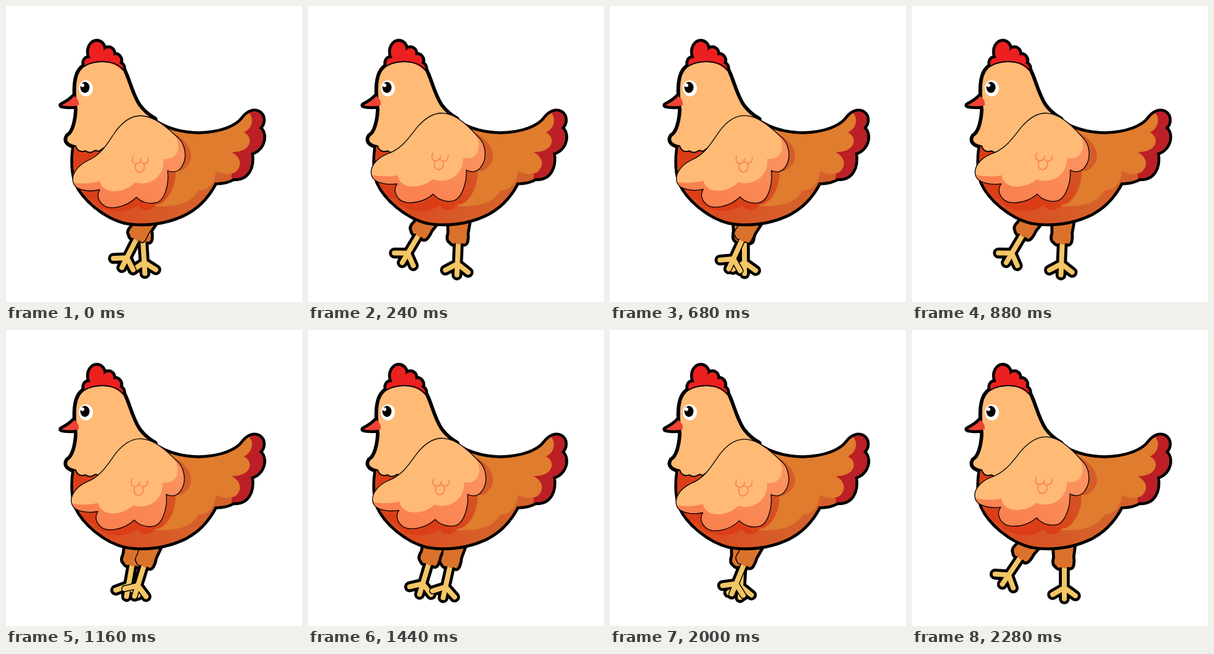
An HTML page for the animation above (2.36 s loop, 480 by 480 pixels).

```html
<!DOCTYPE html>
<html>
<head>
<meta charset="utf-8">
<style>
html, body { margin: 0; width: 100%; height: 100%; overflow: hidden; background: #fff; }
svg { display: block; width: 100%; height: 100%; }
</style>
</head>
<body>
<svg viewBox="0 0 480 480" fill="none" stroke-linejoin="round" stroke-linecap="round">
  <defs>
    <linearGradient id="belly" gradientUnits="userSpaceOnUse" x1="150" y1="0" x2="290" y2="0">
      <stop offset="0" stop-color="#dc4a20"/>
      <stop offset="1" stop-color="#d6602a"/>
    </linearGradient>
    <linearGradient id="shade" gradientUnits="userSpaceOnUse" x1="180" y1="320" x2="290" y2="260">
      <stop offset=".3" stop-color="#db3e17"/>
      <stop offset="1" stop-color="#d35c28"/>
    </linearGradient>
    <linearGradient id="coral" gradientUnits="userSpaceOnUse" x1="190" y1="320" x2="250" y2="220">
      <stop offset="0" stop-color="#fa8150"/>
      <stop offset="1" stop-color="#fb9260"/>
    </linearGradient>
    <path id="body" d="M200 150C225 180 255 207 312 208C350 207 375 196 385 182C393 172 402 169 410 173C419 179 418 191 410 198C423 206 418 233 397 238C401 262 391 281 369 279C361 284 351 286 339 286C327 309 310 328 285 339C258 351 225 356 193 350C160 342 126 313 114 286C108 268 108 248 111 228Z"/>
    <path id="head" d="M128 97C145 87 178 87 190 103C198 117 203 143 215 161C223 172 232 179 241 184L180 215L150 236Q146 233 143 235Q136 240 129 235Q117 239 113 227C101 225 95 219 100 211C109 206 114 188 115 168C113 152 111 135 114 120C116 108 121 101 128 97Z"/>
    <path id="comb" d="M128 97C125 89 130 83 137 85C130 68 140 57 148 58C156 59 160 67 158 73C165 64 176 70 174 80C182 77 188 86 184 93C190 95 191 101 189 105C175 88 145 86 128 97Z"/>
    <path id="beak" d="M90 161Q104 154 111 146Q119 152 118 161Q104 164 90 161Z"/>
    <path id="feather" d="M178 203C190 187 204 178 218 178C240 178 260 196 275 210C292 222 294 246 286 259C281 269 271 271 262 267C265 287 258 316 243 319C230 322 218 317 211.5 310C195 327 168 331 158 323C149 316 147 306 152 298C135 302 115 299 110 289C104 276 114 260 132 251C156 241 166 220 178 203Z"/>
    <clipPath id="inBody"><use href="#body"/></clipPath>
    <clipPath id="inWing"><use href="#feather"/></clipPath>
  </defs>

  <g id="legs"></g>

  <g stroke="#000" stroke-width="9.6" fill="#000">
    <use href="#body"/><use href="#head"/><use href="#comb"/><use href="#beak"/>
  </g>

  <use href="#body" fill="url(#belly)"/>
  <g clip-path="url(#inBody)">
    <path fill="#bc1f25" d="M388 160H425V288H366V230Z"/>
    <path fill="#df7c2e" d="M200 150L390 170C402 176 403 197 386 205C402 213 399 237 366 237C384 247 382 262 371 270C358 275 346 271 340 267C340 287 327 300 312 299C300 322 270 327 235 324L200 260Z"/>
    <path fill="url(#shade)" d="M240 195C300 208 309 245 293 260C288 266 282 269 275 267C277 295 258 324 243 322C236 334 219 334 214 323C195 338 155 336 142 314C126 309 116 299 108 286V225H160Z"/>
  </g>

  <use href="#head" fill="#ffba76" stroke="#000" stroke-width="2"/>
  <use href="#comb" fill="#ed2020"/>
  <path d="M128 97C145 87 178 87 190 104" stroke="#000" stroke-width="1.6"/>
  <ellipse cx="129.5" cy="133.5" rx="11.5" ry="13" fill="#fff"/>
  <ellipse cx="128" cy="132" rx="7.5" ry="9" fill="#000"/>
  <circle cx="124" cy="128.5" r="3" fill="#fff"/>
  <use href="#beak" fill="#ef4334"/>

  <g id="wing">
    <use href="#feather" fill="url(#coral)"/>
    <path clip-path="url(#inWing)" fill="#ffba76" d="M100 284C116 290 138 288 152 284C157 308 194 303 209 286C235 294 259 273 255 248C281 250 285 226 272 207L220 170L100 240Z"/>
    <use href="#feather" stroke="#000" stroke-width="1.3"/>
    <path stroke="#fa8754" stroke-width="1.9" d="M206 244Q202 255 211 256Q218 255 219 248M213 256Q219 251 223 256Q232 255 231 246M210 257Q208 269 217 270Q226 268 224 257"/>
  </g>
</svg>
<script>
const FRAME = 40, LOOP = 2360, LAST = 57, STRIDE = 16;
const $ = s => document.querySelector(s);

// Stride phase against how far the legs are spread
const swing = [[0, 0], [.125, .17], [.375, .91], [.47, 1], [.5625, 1],
  [.625, .81], [.6875, .63], [.8125, .36], [1, 0]];

const thigh = 'M-17 30L-15 62Q-18 73 -13 75Q-9 81 -4 77Q1 82 6 77Q12 80 13 73Q14 67 13 60L17 30Z';
const foot = 'M0 76L0 111L-19 122M0 111L0 129M0 111L18 124';

const limb = (color, edge, line) =>
  `<path d="${foot}" stroke="${line}" stroke-width="${8 + edge * 2}"/>` +
  `<path d="${thigh}" fill="${color}" stroke="${edge ? '#000' : 'none'}" stroke-width="${edge * 2}"/>`;
const leg = (name, art) => `<g class="${name}">${art}</g>`;
const edge = w => limb('#000', w, '#000');
const skin = limb('#db722c', 0, '#f4c666');

$('#legs').innerHTML = leg('far', edge(4.8)) + leg('near', edge(4.8)) +
  leg('far', skin) + leg('near', edge(1.5) + skin);

function spread(phase) {
  const i = swing.findIndex(k => k[0] > phase);
  const [p, a] = swing[i - 1], [q, b] = swing[i];
  return a + (b - a) * (phase - p) / (q - p);
}

function place(name, transform) {
  document.querySelectorAll(name).forEach(e => e.setAttribute('transform', transform));
}

function draw(now) {
  const frame = Math.min(LAST, Math.floor(now % LOOP / FRAME));
  const v = spread(frame / STRIDE % 1);
  place('.near', `translate(242 307) rotate(${27 * (1 - v)}) translate(5 0)`);
  place('.far', `translate(217.5 307) rotate(${37.5 * v - 3.5}) translate(0 -2)`);
  place('#wing', `rotate(${4.9 * v} 272 198)`);
}

const start = performance.now();
function tick() {
  draw(performance.now() - start);
  requestAnimationFrame(tick);
}
tick();
</script>
</body>
</html>
```
